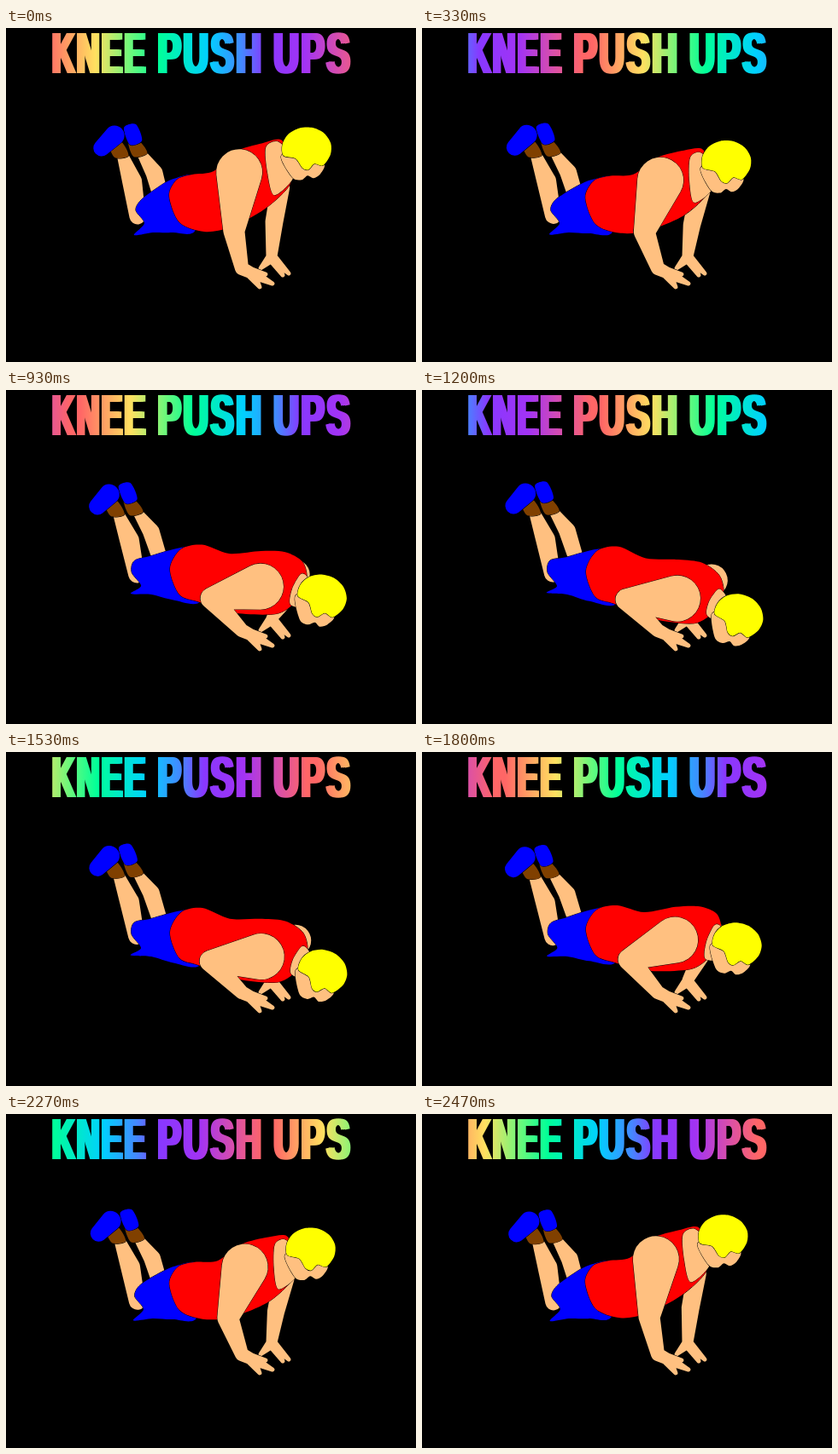
An HTML page for the animation above (2.54 s loop, 480 by 392 pixels).

```html
<!DOCTYPE html>
<html lang="en">
<head>
<meta charset="utf-8">
<title>Knee push ups</title>
<style>
html, body { margin: 0; width: 100%; height: 100%; overflow: hidden; background: #000; }
svg { display: block; width: 100%; height: 100%; }
text { font: bold 68px "Liberation Sans", Arial, sans-serif; fill: #fff; letter-spacing: 4.4px; }
#tint { mix-blend-mode: multiply; }
path { stroke: #000; stroke-width: 1; stroke-linejoin: round; paint-order: stroke; }
</style>
</head>
<body>
<svg viewBox="0 0 480 392" xmlns="http://www.w3.org/2000/svg">
  <defs>
    <linearGradient id="rainbow" gradientUnits="userSpaceOnUse" spreadMethod="repeat" y1="0" y2="0">
      <stop offset="0" stop-color="#ff6666"/>
      <stop offset=".15" stop-color="#ffe060"/>
      <stop offset=".26" stop-color="#66f97c"/>
      <stop offset=".34" stop-color="#00ff99"/>
      <stop offset=".49" stop-color="#00d0ff"/>
      <stop offset=".59" stop-color="#4488ff"/>
      <stop offset=".66" stop-color="#8838ff"/>
      <stop offset=".78" stop-color="#a233f4"/>
      <stop offset=".88" stop-color="#d84eac"/>
      <stop offset=".97" stop-color="#ff6666"/>
    </linearGradient>
  </defs>
  <rect width="480" height="392"/>
  <g id="title">
    <text transform="translate(54 53) scale(.54 1)">KNEE</text>
    <text transform="translate(177.6 53) scale(.6 1)">PUSH</text>
    <text transform="translate(313.4 53) scale(.6 1)">UPS</text>
  </g>
  <use href="#title" x="-2.3"/>
  <use href="#title" x="2.3"/>
  <rect id="tint" x="40" width="400" height="60" fill="url(#rainbow)"/>
  <g id="legs"></g>
  <g id="body"></g>
  <g id="head"></g>
</svg>
<script>
const SKIN = '#ffc080', RED = '#f00', BLUE = '#00f', BROWN = '#804000', YELLOW = '#ff0';
const LOOP = 2540, FRAMES = 38, STEP = 200 / 3, BAND = 390;
const $ = id => document.getElementById(id);

let sink = 0, reach = 0; // vertical and horizontal progress, 0 = arms straight

const mix = (a, b, t) => a + (b - a) * t;
const move = ([x0, y0, x1, y1]) => [mix(x0, x1, reach), mix(y0, y1, sink)];

// Smooth closed outline through a few points.
function blob(points) {
  const n = points.length, at = i => points[(i + n) % n];
  const ctrl = (a, b, c) => a.map((v, i) => v + (c[i] - b[i]) / 7);
  return points.reduce((d, a, i) => {
    const b = at(i + 1);
    return d + `C${ctrl(a, at(i - 1), b)} ${ctrl(b, at(i + 2), a)} ${b}`;
  }, 'M' + points[0]) + 'Z';
}

// Tapered limb wrapped around two circles.
function bone([ax, ay, ar], [bx, by, br]) {
  const t = Math.atan2(by - ay, bx - ax);
  const o = Math.acos((ar - br) / Math.hypot(bx - ax, by - ay));
  const on = (x, y, r, a) => [x + r * Math.cos(a), y + r * Math.sin(a)];
  return `M${on(ax, ay, ar, t + o)}L${on(bx, by, br, t + o)}`
    + `A${br} ${br} 0 ${+(ar < br)} 0 ${on(bx, by, br, t - o)}`
    + `L${on(ax, ay, ar, t - o)}A${ar} ${ar} 0 ${+(ar >= br)} 0 ${on(ax, ay, ar, t + o)}Z`;
}

const limb = (...joints) => joints.slice(1).map((j, i) => bone(joints[i], j)).join('');
const hand = (palm, ...tips) => tips.map(([x, y]) => bone(palm, [x, y, 2.5])).join('');

function add(layer, fill, path) {
  const el = document.createElementNS('http://www.w3.org/2000/svg', 'path');
  el.setAttribute('fill', fill);
  $(layer).append(el);
  const draw = () => el.setAttribute('d', path());
  draw();
  return draw;
}

// Legs: rigid, leaning as one group.
add('legs', SKIN, () => limb([161, 150, 6], [174, 170, 10], [182, 200, 9]));
add('legs', BROWN, () => blob([[144, 133], [157, 133], [166, 147], [150, 151]]));
add('legs', BLUE, () => blob([[139, 117], [153, 113], [160, 132], [146, 137]]));
add('legs', SKIN, () => limb([138, 152, 7], [148, 180, 11.5], [154, 221, 9.5]));
add('legs', BROWN, () => blob([[122, 137], [136, 134], [144, 150], [128, 152]]));
add('legs', BLUE, () => limb([128, 126, 11.5], [112.5, 141, 9.5]));

// Each key point: place at the top, then at the bottom of the push up.
const shorts = [
  [152, 214, 147, 214], [158, 202, 150, 200], [175, 189, 170, 196], [196, 177, 205, 187], [225, 176, 230, 190],
  [222, 237, 228, 250], [195, 240, 196, 248], [172, 240, 170, 240], [150, 243, 146, 238], [162, 229, 158, 230]
];
const vest = [
  [191, 197, 192, 213], [200, 178, 205, 189], [218, 172, 230, 184], [243, 168, 262, 198], [268, 145, 300, 200],
  [300, 135, 328, 204], [322, 131, 348, 219], [330, 150, 353, 240], [333, 182, 343, 260], [303, 212, 318, 275],
  [262, 234, 265, 268], [232, 239, 225, 251], [203, 228, 203, 243]
];
const neck = [
  [304, 140, 346, 236], [318, 133, 352, 238], [334, 150, 357, 248],
  [336, 176, 354, 274], [314, 196, 334, 266], [306, 170, 336, 250]
];

const farArm = () => limb(
  [...move([321, 187, 339, 224]), mix(11, 19, sink)],
  [...move([314, 227, 322, 260]), mix(10.5, 8, sink)],
  [311, 268, 6.5]
) + hand([311, 269, 6.5], [331, 288], [324, 290], [298, 282]);

const nearArm = () => limb(
  [...move([273, 169, 299, 246]), 27],
  [...move([267, 238, 239, 246]), 12.5],
  [276, 282, 8], [286, 287, 7]
) + hand([286, 287, 7], [312, 300], [297, 304], [304, 289]);

const moving = [
  add('body', BLUE, () => blob(shorts.map(move))),
  add('body', SKIN, farArm),
  add('body', RED, () => blob(vest.map(move))),
  add('body', SKIN, () => blob(neck.map(move))),
];

// Head: drawn around its own centre.
add('head', SKIN, () => blob([[-30, 9], [-7, 2], [20, 17], [16, 30], [8, 35], [1, 32], [-6, 37], [-17, 34]]));
add('head', YELLOW, () => {
  const cap = Array.from({ length: 8 }, (_, i) => {
    const a = (160 + 31 * i) * Math.PI / 180;
    return [29 * Math.cos(a), 25 * Math.sin(a)];
  });
  return blob([...cap, [19, 20], [9, 18], [2, 25], [-5, 23], [-13, 12]]);
});
$('body').after($('head'));
const front = document.createElementNS('http://www.w3.org/2000/svg', 'g');
front.id = 'front';
$('head').after(front);
moving.push(add('front', SKIN, nearArm));

function render(time) {
  const n = Math.min(FRAMES - 1, Math.floor((time % LOOP + 5) / STEP));
  sink = (1 - Math.cos(2 * Math.PI * (n - .6) / FRAMES)) / 2;
  reach = sink * (2 - sink);
  moving.forEach(draw => draw());

  const lean = 14 * sink - 20 * Math.sqrt(sink), k = lean / 118;
  $('legs').setAttribute('transform', `matrix(1 0 ${-k} 1 ${k * 230 - sink} ${-5 * sink})`);
  const [x, y] = move([352, 141, 371, 267]);
  $('head').setAttribute('transform', `translate(${x} ${y}) rotate(${22 * sink})`);

  const start = 46 + 3 * BAND * n / FRAMES;
  $('rainbow').setAttribute('x1', start);
  $('rainbow').setAttribute('x2', start + BAND);
}

let begin;
function tick(now) {
  begin ??= now;
  render(now - begin);
  requestAnimationFrame(tick);
}
render(0);
requestAnimationFrame(tick);
</script>
</body>
</html>
```
